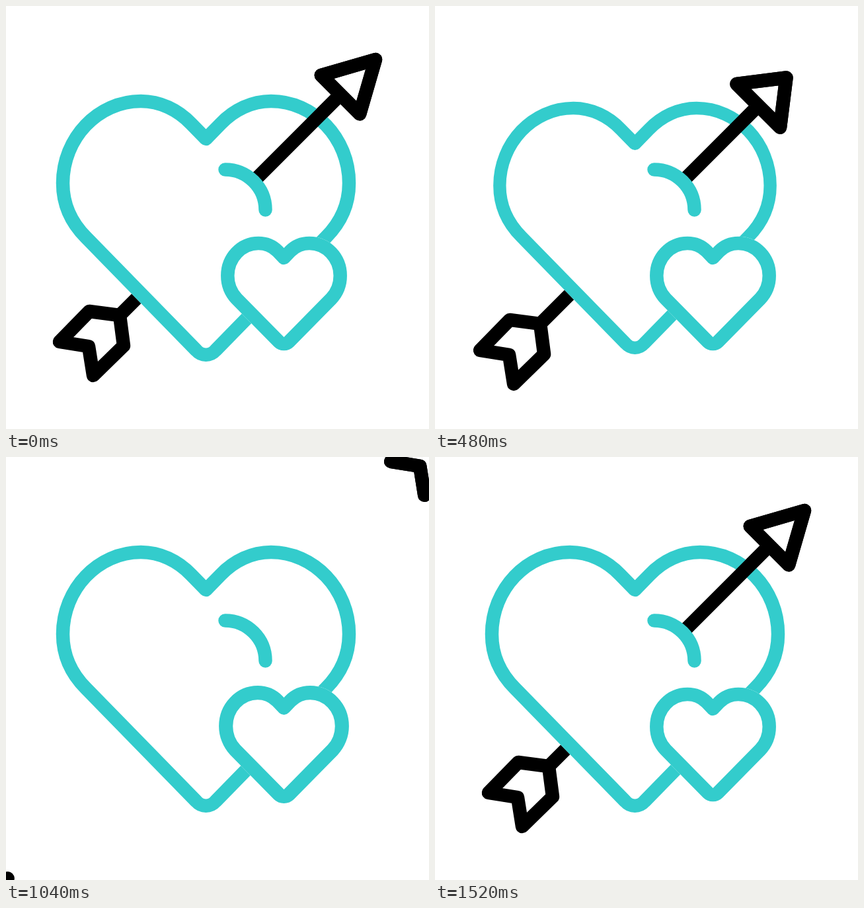
Recreate the animation shown at these times as an HTML page with a canvas. Size 640x640 px, loop 2 s.

```html
<!DOCTYPE html>
<html lang="en">
<head>
<meta charset="utf-8">
<title>Hearts and arrow</title>
<style>
html, body { margin: 0; width: 100%; height: 100%; overflow: hidden; background: #fff; }
canvas { display: block; width: 100vw; height: 100vh; }
</style>
</head>
<body>
<canvas id="stage" width="640" height="640"></canvas>
<script>
const ctx = document.getElementById('stage').getContext('2d');
const LOOP = 2000, STEP = 40;
const TEAL = '#33cccc', BLACK = '#000', WHITE = '#fff', LINE = 20.5;

const clamp = u => Math.min(1, Math.max(0, u));
const mix = (a, b, u) => a + (b - a) * u;
const progress = (t, from, to) => clamp((t - from) / (to - from));
const easeOut = u => 1 - (1 - u) ** 2;
const easeIn = u => u * u;
const smooth = u => u * u * (3 - 2 * u);

const bigHeart = {
  x: 302.5, y: 336,
  path: new Path2D(`M302.5 201 L280 178 C260 157 233 144 204 144
    C139 144 86 200 86 268 C86 300 99 328 121 350 L288 521
    C296 530 309 530 317 521 L484 350 C506 328 519 300 519 268
    C519 200 466 144 401 144 C372 144 345 157 325 178 Z`)
};
const smallHeart = {
  x: 420.5, y: 435,
  path: new Path2D(`M420.5 381 L411 371 C403.5 363.5 393 359 382 359
    C356 359 335.3 381 335.3 408 C335.3 421 340.5 434 349 443 L413 508
    C417 512 424 512 428 508 L492 443 C500.5 434 505.7 421 505.7 408
    C505.7 381 485 359 459 359 C448 359 437.5 363.5 430 371 Z`)
};
const feather = new Path2D('M81 508 L126 462 L172 468 L178 514 L132 559 L125 515 Z');
const ARC = { x: 331.5, y: 308.5, r: 61 };

function drawHeart(heart, scale) {
  ctx.save();
  ctx.translate(heart.x, heart.y);
  ctx.scale(scale, scale);
  ctx.translate(-heart.x, -heart.y);
  ctx.fillStyle = ctx.strokeStyle = WHITE;
  ctx.fill(heart.path);
  ctx.stroke(heart.path);
  ctx.strokeStyle = TEAL;
  ctx.stroke(heart.path);
  ctx.restore();
}

// The arrow lies on the diagonal x + y = 640; the head stretches along and across it.
function drawArrow({ shift, along, across }) {
  const base = 506 + 19 * (along - 1);
  const tip = base + 53 * along;
  const half = 29.2 * across;
  ctx.save();
  ctx.translate(shift, -shift);
  ctx.strokeStyle = BLACK;
  ctx.stroke(feather);
  ctx.beginPath();
  ctx.moveTo(172, 468);
  ctx.lineTo(base, 640 - base);
  ctx.moveTo(base - half, 640 - base - half);
  ctx.lineTo(tip, 640 - tip);
  ctx.lineTo(base + half, 640 - base + half);
  ctx.closePath();
  ctx.stroke();
  ctx.restore();
}

function leavingArrow(t) {
  const pull = easeOut(progress(t, 167, 667));
  const flight = 0.003575 * Math.max(0, t - 660) ** 2;
  return {
    shift: flight - 15 * pull,
    along: mix(1, 0.764, pull),
    across: mix(1, 1.145, pull)
  };
}

function arrivingArrow(t) {
  const settle = smooth(progress(t, 1333, 1500));
  return {
    shift: -620 * (1 - easeIn(progress(t, 917, 1333))),
    along: mix(1.13, 1, settle),
    across: mix(0.838, 1, settle)
  };
}

function bigScale(t) {
  const dip = t < 500 ? easeOut(progress(t, 167, 500)) : 1 - easeIn(progress(t, 500, 833));
  return 1 - 0.055 * dip;
}

function smallScale(t) {
  const beats = [1, 0.972, 1.05, 0.9185, 1];
  const pos = 4 * progress(t, 667, 1333);
  const i = Math.min(3, Math.floor(pos));
  return mix(beats[i], beats[i + 1], smooth(pos - i));
}

function clipBeyondArc() {
  ctx.beginPath();
  ctx.arc(ARC.x, ARC.y, ARC.r, -Math.PI / 2, 0);
  ctx.lineTo(640, ARC.y);
  ctx.lineTo(640, 0);
  ctx.lineTo(ARC.x, 0);
  ctx.closePath();
  ctx.clip();
}

function draw(t) {
  const arrows = [];
  if (t < 1240) arrows.push(leavingArrow(t));
  if (t > 917) arrows.push(arrivingArrow(t));

  ctx.fillStyle = WHITE;
  ctx.fillRect(0, 0, 640, 640);
  ctx.lineWidth = LINE;
  ctx.lineJoin = ctx.lineCap = 'round';

  arrows.forEach(drawArrow);
  drawHeart(bigHeart, bigScale(t));

  ctx.save();
  clipBeyondArc();
  arrows.forEach(drawArrow);
  ctx.restore();

  ctx.strokeStyle = TEAL;
  ctx.beginPath();
  ctx.arc(ARC.x, ARC.y, ARC.r, -Math.PI / 2, 0);
  ctx.stroke();

  drawHeart(smallHeart, smallScale(t));
}

const start = performance.now();
function tick() {
  const t = (performance.now() - start) % LOOP;
  draw(Math.floor(t / STEP) * STEP);
  requestAnimationFrame(tick);
}
tick();
</script>
</body>
</html>
```
